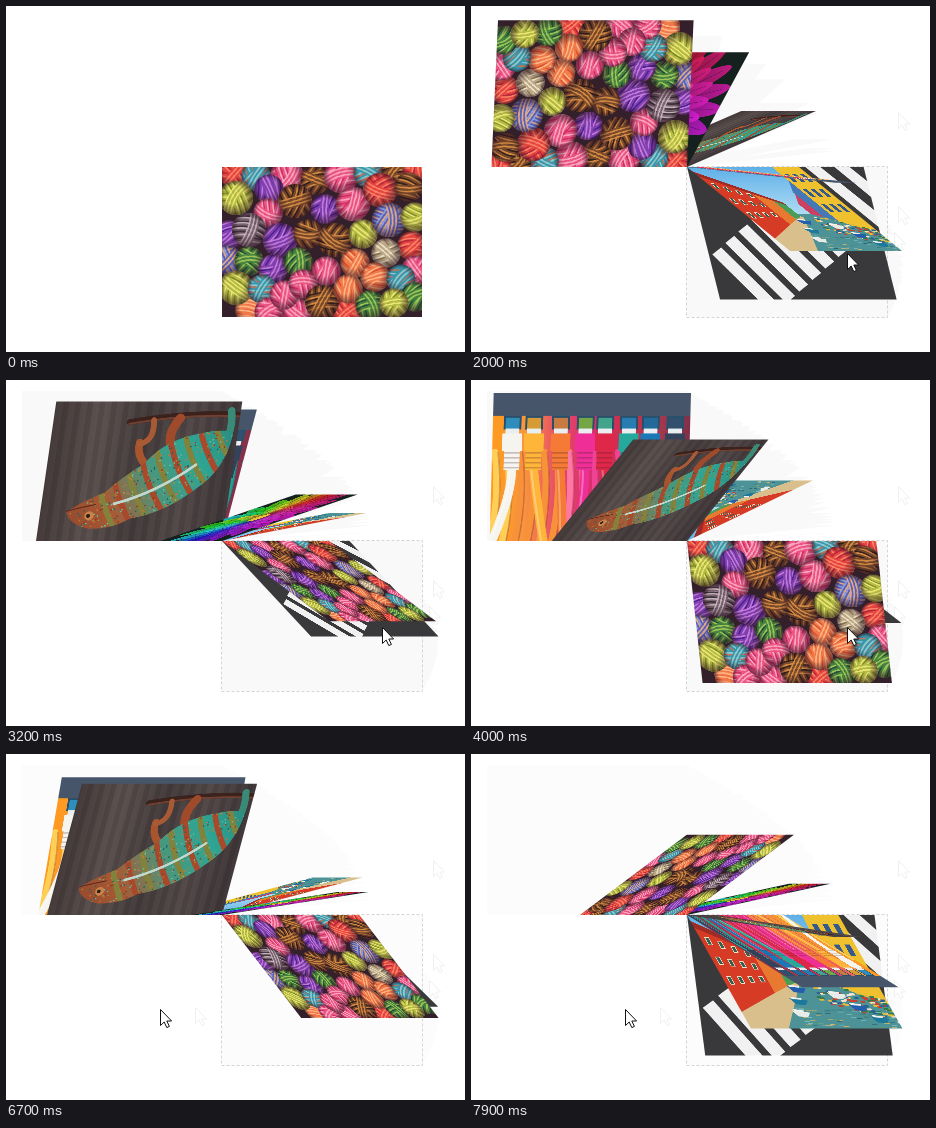
Write an HTML page with a canvas that moves like this. It is 459 px wide and 346 px high and loops after 8 s.

```html
<!DOCTYPE html>
<html lang="en">
<head>
<meta charset="utf-8">
<title>Folding photo fan</title>
<style>
html, body { margin: 0; width: 100%; height: 100%; overflow: hidden; background: #fff; }
canvas { display: block; width: 459px; height: 346px; }
</style>
</head>
<body>
<canvas id="stage" width="459" height="346"></canvas>
<script>
const LOOP = 8000, STEP = 100, W = 200, H = 150, LEFT = 216, TOP = 161;
const OPEN_AT = 740, CLOSE_AT = 6150, TURN = 4550;
const stage = document.getElementById('stage').getContext('2d');

let seed = 7;
const rand = () => (seed = (seed * 16807) % 2147483647) / 2147483647;

// ---------- drawing helpers ----------
function picture(paint) {
  const c = document.createElement('canvas');
  c.width = W * 2;
  c.height = H * 2;
  const g = c.getContext('2d');
  g.scale(2, 2);
  g.lineCap = g.lineJoin = 'round';
  paint(g);
  return c;
}
function box(g, color, x, y, w, h) {
  g.fillStyle = color;
  g.fillRect(x, y, w, h);
}
function poly(g, color, ...xy) {
  g.fillStyle = color;
  g.beginPath();
  for (let i = 0; i < xy.length; i += 2) g.lineTo(xy[i], xy[i + 1]);
  g.fill();
}
function curve(g, color, width, x0, y0, x1, y1, x2, y2) {
  g.strokeStyle = color;
  g.lineWidth = width;
  g.beginPath();
  g.moveTo(x0, y0);
  g.quadraticCurveTo(x1, y1, x2, y2);
  g.stroke();
}
function disc(g, color, x, y, r) {
  g.fillStyle = color;
  g.beginPath();
  g.arc(x, y, r, 0, 7);
  g.fill();
}
function fade(g, x0, y0, x1, y1, ...colors) {
  const f = g.createLinearGradient(x0, y0, x1, y1);
  colors.forEach((c, i) => f.addColorStop(i / (colors.length - 1), c));
  return f;
}

// ---------- pictures ----------
const WOOL = {
  r: ['#e8453f', '#fa8468', '#b8283c'], p: ['#ec5585', '#fba6bd', '#cc3166'],
  v: ['#8040b0', '#c47ad8', '#4b2090'], b: ['#5a60b4', '#e0a888', '#8c9ede'],
  k: ['#7a4a2c', '#d58a42', '#35221c'], g: ['#45853f', '#a0c458', '#24503a'],
  y: ['#b4bc42', '#ece676', '#7e8a2c'], o: ['#f27a4a', '#ffb684', '#dc5232'],
  t: ['#3b95a8', '#86ccd6', '#c07458'], m: ['#78646f', '#c6b0ba', '#3d323c'],
  w: ['#baa888', '#eee0c2', '#8a7656']
};
// Upper case marks a larger ball.
const BALLS = [
  [12, 6, 'r'], [34, 9, 't'], [65, 10, 'P'], [93, 13, 'k'], [119, 9, 'P'], [146, 6, 't'],
  [174, 3, 'k'], [195, 2, 'r'], [14, 31, 'Y'], [47, 22, 'v'], [73, 34, 'K'], [103, 42, 'v'],
  [131, 37, 'P'], [158, 23, 'R'], [187, 20, 'k'], [46, 46, 'p'], [6, 68, 'v'], [27, 63, 'M'],
  [58, 73, 'V'], [86, 67, 'k'], [113, 73, 'K'], [141, 67, 'y'], [167, 53, 'B'], [193, 50, 'y'],
  [190, 79, 'r'], [164, 86, 'w'], [5, 93, 'b'], [27, 94, 'g'], [51, 102, 'v'], [76, 95, 'g'],
  [104, 104, 'p'], [194, 103, 'p'], [133, 96, 'o'], [153, 110, 'o'], [179, 112, 't'],
  [28, 143, 'o'], [14, 121, 'Y'], [40, 122, 't'], [47, 145, 'p'], [75, 146, 'p'], [62, 128, 'p'],
  [81, 117, 'p'], [125, 146, 'r'], [100, 135, 'K'], [126, 122, 'o'], [193, 130, 'g'],
  [148, 138, 'g'], [172, 136, 'y']
];
// A band of parallel threads wound across a ball of radius r.
function wind(g, r, half, colors) {
  g.save();
  g.rotate(rand() * Math.PI);
  const bow = (rand() - .5) * r;
  for (let d = -half, i = 0; d <= half; d += 1.8, i++)
    curve(g, colors[i % colors.length], 1.5, -r, d, 0, d + bow, r, d);
  g.restore();
}
const yarn = picture(g => {
  box(g, '#34202a', 0, 0, W, H);
  for (const [x, y, key] of BALLS) {
    const r = key < 'a' ? 17 : 14.5;
    const [base, light, dark] = WOOL[key.toLowerCase()];
    g.save();
    g.translate(x, y);
    disc(g, base, 0, 0, r);
    g.clip();
    wind(g, r, r, [base, light, base, dark]);
    wind(g, r, r * .45, [light, base, dark]);
    wind(g, r, r * .3, [base, light]);
    const shade = g.createRadialGradient(-2, -3, r * .55, 0, 0, r);
    shade.addColorStop(0, 'rgba(40,15,30,0)');
    shade.addColorStop(1, 'rgba(40,15,30,.6)');
    box(g, shade, -r, -r, 2 * r, 2 * r);
    g.restore();
  }
});

const flower = picture(g => {
  box(g, '#14211f', 0, 0, W, H);
  for (let ring = 0; ring < 4; ring++) {
    const reach = 104 - ring * 22;
    for (let i = 0; i < 22; i++) {
      const a = (i + ring / 2) / 22 * 2 * Math.PI;
      // Purple and magenta dominate the left side; the right runs through the spectrum.
      const swing = a - Math.PI;
      const hue = (305 - swing * 30 - swing ** 3 * 4.5 + 720) % 360;
      g.save();
      g.translate(100, 75);
      g.rotate(a);
      g.fillStyle = fade(g, 0, 0, reach, 0, `hsl(${hue},70%,18%)`, `hsl(${hue},75%,${42 + ring * 5}%)`);
      g.beginPath();
      g.ellipse(reach / 2, 0, reach / 2, 3 + reach / 11, 0, 0, 7);
      g.fill();
      curve(g, 'rgba(20,0,30,.4)', .8, reach * .2, 0, reach / 2, 1, reach * .9, 0);
      g.restore();
    }
  }
  disc(g, '#e6c22e', 100, 75, 12);
});

const chameleon = picture(g => {
  box(g, fade(g, 0, 0, W, 0, '#40383a', '#544a4a', '#463e3e', '#5c5250', '#443b3a'), 0, 0, W, H);
  for (let x = 4; x < W; x += 13) box(g, 'rgba(25,15,18,.13)', x, 0, 6, H);
  curve(g, '#3b221c', 6, 0, 136, 55, 139, 118, 128);
  curve(g, '#704030', 2, 0, 134, 55, 137, 118, 126);
  curve(g, '#a8542c', 8, 80, 72, 106, 86, 104, 106);
  curve(g, '#a85a34', 6, 104, 104, 88, 108, 92, 130);
  curve(g, '#a04a2c', 10, 58, 88, 82, 108, 64, 132);
  curve(g, '#3a8a78', 8, 24, 92, 3, 108, 10, 140);

  const body = new Path2D('M172 31 Q168 18 145 13 Q120 13 103 24 Q66 30 34 58 Q6 80 5 118 Q24 120 38 116 Q76 110 95 84 Q118 68 134 52 Q158 42 172 31Z');
  g.save();
  g.clip(body);
  box(g, fade(g, 0, 120, 170, 10, '#2b8a7c', '#2fa594', '#4a967c', '#a85a34', '#94482c'), 0, 0, W, H);
  for (let i = 0; i < 9; i++) {
    const x = 12 + i * 14, y = 104 - i * 9.5;
    curve(g, i % 2 ? '#a8492c' : '#82823c', 6, x - 14, y - 26, x + 8, y + 3, x + 16, y + 30);
  }
  for (let i = 0; i < 700; i++)
    disc(g, ['#c8743a', '#1c625c', '#68bfa8', '#8c3826', '#a09044'][i % 5], rand() * 175, rand() * 120, .9);
  curve(g, '#c0d8ce', 3, 40, 82, 78, 52, 122, 40);
  g.restore();
  disc(g, '#c8824a', 147, 27, 5);
  disc(g, '#271c18', 148, 27, 2);
  curve(g, '#5e2c20', 1.2, 172, 32, 158, 36, 142, 39);
});

const cables = picture(g => {
  g.translate(W, H);
  g.rotate(Math.PI);
  box(g, fade(g, 0, 0, W, 0, '#ff9a1e', '#f8963c', '#e84a6a', '#d8306a', '#c8304c', '#a83850', '#803048'), 0, 0, W, H);
  const colors = ['#f6f4ee', '#ffb43a', '#f47a35', '#ef2f97', '#df2849', '#25a99c', '#1b78b6', '#34435c'];
  const tints = ['#ffcf55', '#f7913a', '#ff78a4', '#f04292', '#e8405c', '#24a090'];
  // Loose cables behind, warm on the left and cooler to the right.
  for (let i = 0; i < 17; i++) {
    const x = i * 12.5, tint = tints[Math.min(5, Math.floor(i / 3 + rand()))];
    curve(g, tint, 7, x + 3, 60, x + 10, 110, x - 2, 160);
    curve(g, 'rgba(90,10,40,.25)', 1.5, x + 6, 60, x + 13, 110, x + 2, 160);
  }
  const xs = [20, 42, 69, 94, 114, 138, 160, 185];
  xs.forEach((x, i) => {
    const end = i ? x + [0, 14, 5, -9, 14, 19, 5, 13][i] : -2;
    curve(g, colors[i], 9, x, 72, x + 3, 102, end, 160);
    curve(g, 'rgba(255,255,255,.3)', 2, x - 2, 75, x + 1, 102, end - 2, 160);
  });
  box(g, '#46556a', 0, 0, W, 23);
  xs.forEach((x, i) => {
    box(g, '#28506a', x - 9, 23, 18, 14);
    box(g, ['#2f8dbb', '#d69b35', '#c77b40', '#75a646', '#43a48c', '#277cb1', '#236a9b', '#31506e'][i], x - 7, 25, 14, 11);
    box(g, '#e9eff0', x - 7, 36, 14, 6);
    box(g, colors[i], x - 10, 41, 20, 18);
    box(g, colors[i], x - 8, 58, 16, 20);
    for (let y = 60; y < 76; y += 5) box(g, 'rgba(60,25,35,.25)', x - 8, y, 16, 1.4);
  });
});

const houses = picture(g => {
  box(g, fade(g, 0, 0, 0, 90, '#5fb0e8', '#b4def4'), 0, 0, W, H);
  poly(g, '#4c9296', 90, 84, 130, 84, 200, 118, 200, 150, 36, 150);
  poly(g, '#d9bf8c', 0, 120, 92, 86, 98, 90, 50, 150, 0, 150);
  poly(g, '#d63b26', 0, 12, 58, 46, 58, 103, 0, 128);
  poly(g, '#e87930', 58, 46, 80, 60, 80, 94, 58, 103);
  poly(g, '#4a9d58', 80, 60, 94, 67, 94, 89, 80, 94);
  poly(g, '#a02a24', 0, 8, 94, 64, 94, 68, 0, 17);
  poly(g, '#efc12f', 200, 0, 152, 0, 146, 95, 200, 118);
  poly(g, '#4478b6', 152, 24, 134, 45, 134, 88, 152, 97);
  poly(g, '#cd4060', 134, 48, 118, 66, 118, 84, 134, 90);
  for (let i = 0; i < 4; i++) {
    for (let j = 0; j < 3; j++) {
      const x = 7 + i * 14, y = 29 + i * 6 + j * 26 - i * j * 3;
      box(g, '#f4e0c4', x - 1, y, 6, 11 - i);
      box(g, '#315f50', x, y + 1, 4, 9 - i);
    }
  }
  for (let i = 0; i < 3; i++)
    for (let j = 0; j < 3; j++) box(g, '#33598e', 158 + i * 14, 12 + j * 27, 7, 15);
  // Awnings and reflections along the right bank.
  for (let i = 0; i < 110; i++) {
    const x = 110 + rand() * 90, y = (x - 110) * .33 + 84 + rand() * 28;
    box(g, ['#c8402e', '#2d7a4c', '#e8b838', '#2c5f94', '#ece4d0'][i % 5], x, y, 6, 2.5);
  }
  for (let i = 0; i < 70; i++)
    box(g, ['#78bcc0', '#2a6472', '#d3b064', '#5a9a7c'][i % 4], 66 + rand() * 128, 122 + rand() * 27, 7, 1);
  for (let i = 0; i < 6; i++) {
    const x = i % 2 ? 126 + i * 10 : 88 - i * 3, y = 94 + i * 8;
    poly(g, ['#235fae', '#e8ece8', '#1d799c'][i % 3], x - 9, y, x + 14, y + 3, x + 8, y + 9, x - 4, y + 8);
    poly(g, '#f1f2ec', x - 7, y - 2, x + 7, y, x + 6, y + 2, x - 6, y + 1);
  }
});

const crossing = picture(g => {
  box(g, '#39393b', 0, 0, W, H);
  const white = '#f1f1f1';
  for (let i = 0; i < 6; i++) {
    const x = 4 + i * 18, y = 99 - i * 13;
    poly(g, white, x, y, x + 12, y - 8, x + 64, y + 60, x + 52, y + 68);
  }
  for (let i = 0; i < 4; i++) {
    const x = 101 + i * 33;
    poly(g, white, x, 0, x + 17, 0, x + 79, 62, x + 66, 68);
  }
});

// Bottom to top; each card turns one multiple more than the one below it.
const CARDS = [crossing, houses, cables, chameleon, flower, yarn];

// ---------- motion ----------
function ease(p) {
  if (p <= 0) return 0;
  if (p >= 1) return 1;
  let lo = 0, hi = 1;
  for (let i = 0; i < 24; i++) {
    const u = (lo + hi) / 2;
    if (.75 * u * (1 - u) + u ** 3 < p) lo = u; else hi = u;
  }
  return .3 * lo * (1 - lo) ** 2 + 3 * lo * lo * (1 - lo) + lo ** 3;
}
const fanAngle = t => Math.PI / 3 * (ease((t - OPEN_AT) / TURN) - ease((t - CLOSE_AT) / TURN));

// Orthographic rotateY(a) rotateX(a) about the card's top left corner.
function pose(angle) {
  const k = Math.cos(angle);
  return [k, 0, 1 - k * k, k, LEFT, TOP];
}

const CURSOR = [
  [300, 427, 106], [500, 427, 200], [600, 423, 226], [700, 376, 247],
  [6000, 189, 253], [6100, 154, 255]
];
const arrow = new Path2D('M.5 .5V16.5L4.2 13L6.8 18.6L9.4 17.4L6.8 12H11.6Z');

function drawArrow(x, y, color) {
  stage.save();
  stage.translate(x, y);
  stage.fillStyle = '#fff';
  stage.strokeStyle = color;
  stage.fill(arrow);
  stage.stroke(arrow);
  stage.restore();
}
const passedSpots = t => CURSOR.filter(c => c[0] <= t);

// Pale area the cards and the pointer have swept over so far.
function drawSweep(t) {
  const area = new Path2D(), card = new Path2D();
  card.rect(0, 0, W, H);
  for (let s = 700; s <= Math.min(t, 5300); s += STEP)
    CARDS.forEach((_, i) => area.addPath(card, new DOMMatrix(pose(fanAngle(s) * (i + 1)))));
  stage.fillStyle = t < 6000 ? '#f9f9f9' : '#fcfcfc';
  stage.fill(area);
  passedSpots(t).slice(0, -1).forEach(([at, x, y]) => {
    if (at !== 700) drawArrow(x, y, '#f0f0f0');
  });
}

function draw(t) {
  const angle = fanAngle(t);
  const coverIsFlat = Math.cos(angle * CARDS.length) > .999;
  stage.fillStyle = '#fff';
  stage.fillRect(0, 0, 459, 346);
  stage.lineWidth = 1;
  drawSweep(t);
  if (!coverIsFlat) {
    stage.strokeStyle = '#d4d4d4';
    stage.setLineDash([3, 2]);
    stage.strokeRect(LEFT - .5, TOP - .5, W + 1, H + 1);
    stage.setLineDash([]);
  }
  CARDS.forEach((card, i) => {
    stage.save();
    stage.transform(...pose(angle * (i + 1)));
    stage.drawImage(card, 0, 0, W, H);
    stage.restore();
  });
  const spot = passedSpots(t).pop();
  if (spot) drawArrow(spot[1], spot[2], '#111');
}

const start = performance.now();
let shown = -1;
function tick() {
  const t = Math.floor((performance.now() - start) % LOOP / STEP) * STEP;
  if (t !== shown) draw(shown = t);
  requestAnimationFrame(tick);
}
tick();
</script>
</body>
</html>
```
